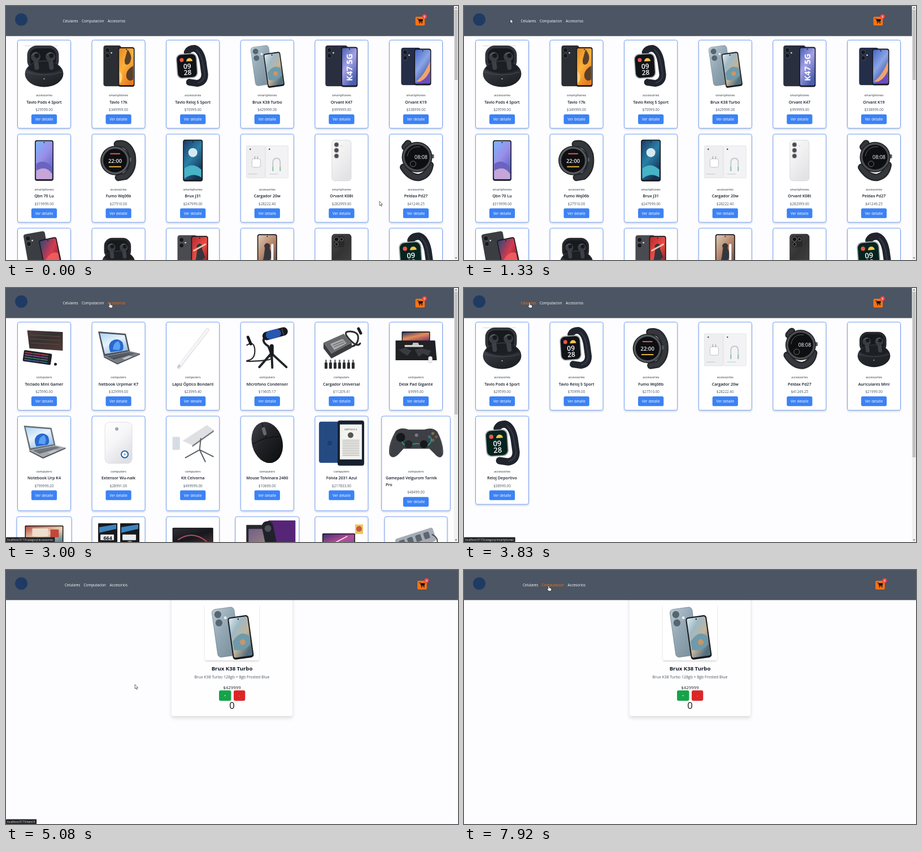
Animation of 800x450 px, one loop 8 s. Source, as an HTML page:

```html
<!DOCTYPE html>
<html lang="es">
<head>
<meta charset="utf-8">
<title>Tienda</title>
<style>
html, body { margin: 0; width: 100%; height: 100%; overflow: hidden; background: #fdfdff; }
svg { display: block; width: 100vw; height: 100vh; }
text { font-family: "Open Sans", "Noto Sans", sans-serif; white-space: pre; }
</style>
</head>
<body>
<svg id="stage" viewBox="0 0 800 450"></svg>
<script>
// --- drawing helpers ---
const defs = [];
const rect = (x, y, w, h, r, f, a = '') => `<rect x="${x}" y="${y}" width="${w}" height="${h}" rx="${r}" fill="${f}" ${a}/>`;
const dot = (x, y, r, f, a = '') => `<circle cx="${x}" cy="${y}" r="${r}" fill="${f}" ${a}/>`;
const path = (d, f, a = '') => `<path d="${d}" fill="${f}" ${a}/>`;
const line = (d, c, w = 1) => path(d, 'none', `stroke="${c}" stroke-width="${w}" stroke-linecap="round" stroke-linejoin="round"`);
const text = (x, y, size, str, f, weight = 400, anchor = 'middle', a = '') =>
  `<text x="${x}" y="${y}" font-size="${size}" fill="${f}" font-weight="${weight}" text-anchor="${anchor}" ${a}>${str}</text>`;
const put = (x, y, s, deg = 0, k = 1) => `<g transform="translate(${x} ${y}) rotate(${deg}) scale(${k})">${s}</g>`;
const grad = (...colors) => {
  const id = 'g' + defs.length;
  const stops = colors.map((c, i) => `<stop offset="${i / (colors.length - 1)}" stop-color="${c}"/>`).join('');
  defs.push(`<linearGradient id="${id}" x1="0" y1="0" x2=".6" y2="1">${stops}</linearGradient>`);
  return `url(#${id})`;
};

// --- product pictures, each centred on 0,0 ---
const back = (x, y, w, h, f, deg = 0, lens = '#15181d') => put(x, y,
  rect(-w / 2, -h / 2, w, h, 4, f, 'stroke="#0004" stroke-width=".8"') +
  dot(-w / 2 + 7, -h / 2 + 8, 4, lens, 'stroke="#8889" stroke-width=".7"') +
  dot(-w / 2 + 7, -h / 2 + 18, 4, lens, 'stroke="#8889" stroke-width=".7"') +
  dot(-w / 2 + 14, -h / 2 + 13, 1.4, '#d8d8d8'), deg);
const front = (x, y, w, h, f, deg = 0, extra = '') => put(x, y,
  rect(-w / 2, -h / 2, w, h, 4, '#17191f') +
  rect(-w / 2 + 1.6, -h / 2 + 1.8, w - 3.2, h - 4.6, 2.5, f) +
  extra + dot(0, -h / 2 + 4, 1, '#111'), deg);
const roundWatch = (x, y, r, rim, strap, hands) =>
  line(strap, '#26282b', 13) + line(strap, '#34373b', 8) +
  rect(x + r - 2, y - 5, 5, 7, 1.5, '#55585c') + dot(x, y, r, '#1b1d20') + dot(x, y, r - 1.5, rim) + dot(x, y, r - 5, '#0d0f12') + hands;
const squareWatch = (f = '#101318') =>
  line('M-10-25Q-7-32 3-32Q14-29 18-8L21 14Q21 28 8 30L-6 28', '#20242d', 12) +
  line('M7-29Q16-20 18-4L21 14Q20 26 9 29', '#343a47', 2) +
  put(-10, -1, rect(-19, -22, 37, 44, 9, '#a9acae') + rect(-17.4, -20.4, 33.8, 40.8, 8, f) +
    dot(-9, -11, 3.5, '#f0554a') + path('M-1-8a5 5 0 0 1 11 0z', '#f7c64a') +
    text(0, 5, 12, '09', '#fff', 600) + text(0, 16, 12, '28', '#fff', 600), -4);
const buds = (f) =>
  rect(-30, -37, 56, 44, 17, f) + rect(-25, -32, 46, 34, 12, '#17191c') +
  `<ellipse cx="0" cy="13" rx="34" ry="23.5" fill="${grad('#464a50', f, '#1d2024')}"/>` +
  path('M-30 5Q-24-9 0-9T30 5Q16 12 0 12T-30 5z', '#1c1f23') +
  [-15, 11].map(x => line(`M${x} -13L${x + 2} 2`, '#3d4147', 8) + dot(x, -17, 8.5, '#3a3e44') + dot(x + 2, -19, 4, '#17191c') + line(`M${x - 6} -20Q${x - 3} -25 ${x + 2} -24`, '#747a82', 1)).join('') +
  line('M-31 10Q0 20 31 10', '#565b62', .7) + dot(0, 22, 1, '#ddd');
const laptop = (body, dark) =>
  path('M-36-30L13-26 20 5-26 14z', dark) + path('M-33-27L11-23.5 17 3-24 10z', grad('#a9d5f3', '#e9f2fa', '#9cc4e6')) +
  path('M-14 7Q-20-6-12-13-2-20 7-11 11 0 6 4z', '#2868d0') + path('M-10 2Q-9-11 0-13 6-4 1 3z', '#5ca2f2') +
  path('M-26 14L20 5 38 9-2 26z', body) + path('M-20 14L19 7 28 9-8 20z', dark) +
  line('M-15 16L23 8', '#888c92', .6) + path('M6 18L18 13 25 14 12 20z', '#bfc3c8') + path('M-26 14L-2 26 38 9v2L-2 28.5-26 16z', '#4e5258');
const screen = (x, y, w, h, f) => rect(x, y, w, h, 1.5, '#141518') + rect(x + 1.5, y + 1.5, w - 3, h - 3, 0, f);

const orange = grad('#e38a24', '#ffb13b', '#e77d1d');
const swirl = path('M2-31Q13-18 5-6-4 0-3-13z', '#5b4129') + path('M12-2Q-2 6 0 18 4 28 12 22z', '#594029') + path('M-12 8Q-4 14-10 28L-12 27z', '#ffd27a');
const misty = put(-9, -1, rect(-16, -35, 32, 69, 5, grad('#b9c9d3', '#93a7b4', '#7d929f'), 'stroke="#6d808c" stroke-width=".6"') +
  dot(-8, -27, 5, '#566671') + dot(-8, -15, 5, '#566671') + dot(2, -21, 2, '#e8eef2'), -8) +
  front(12, 6, 30, 61, grad('#e0e9ed', '#9db9c5', '#c4b39a', '#54707e'), -8,
    path('M-12 4Q2-12 12 0V12Q0 22-12 16z', '#6f9aaa') + dot(2, 7, 4, '#c99669'));
const person = path('M-4-12a5 5 0 1 1 8 0L10 4 5 8 8 26H1L-1 12-5 27-11 25-6 4z', '#35363d');

const art = {
  buds: line('M-34-36.5H24', '#c9c9cc', .8) + buds('#30343a'),
  buds2: put(0, 2, buds('#25272b'), 0, .85),
  p13: back(-11, -1, 31, 72, '#2b2e32') + front(14, 1, 29, 70, orange, 0, swirl),
  watch: squareWatch(), watch2: put(2, 2, squareWatch('#06241f'), 0, 1.08),
  misty,
  k47: back(-9, -1, 39, 72, '#2a2f40') + front(14, 1, 29, 71, grad('#4b62b5', '#a5a2e6', '#4a5fb0'), 0,
    text(-25, 5, 14.5, 'K47 5G', '#fff', 700, 'start', 'transform="rotate(-90)"')),
  k19: back(-9, 0, 34, 66, '#252e49') + front(12, 1, 30, 65, grad('#4567c6', '#8aa5e6', '#3c489b'), 0,
    path('M-12 26Q2 16 13-10V26z', '#f0a46b') + path('M-12 29Q6 24 13 6V29z', '#6a4ec0')),
  qbn: front(0, 0, 33, 72, grad('#79b6ff', '#9a8fe8', '#5f62c8'), 0,
    path('M-14 6Q0-4 14 12V33H-14z', '#6a63c0') + path('M-14 18Q4 8 14 24V33H-14z', '#c6a6d8')),
  fumo: roundWatch(-6, 0, 26, '#54575b', 'M-2-29Q17-33 24-10 28 16 12 28L0 30',
    text(-6, 4, 9.5, '22:00', '#f4f4f4', 600) + line('M-14-12H2', '#e65a4d', 2) + line('M-16 11H4', '#e5b23f', 2)),
  j31: front(0, 0, 35, 74, grad('#1c3c66', '#297fa8', '#16304e'), 0,
    dot(0, -14, 8, '#d7e9f0') + path('M-15 14Q0 2 15 16V30Q0 20-15 32z', '#48b3c6')),
  cargador: rect(-37, -26, 33, 57, 1, '#eeeef0', 'stroke="#d6d8dc" stroke-width=".6"') +
    rect(-3, -26, 40, 57, 1, '#f3f3f5', 'stroke="#d6d8dc" stroke-width=".6"') +
    rect(-27, -3, 15, 15, 3, '#fff', 'stroke="#a9adb2" stroke-width=".7"') + line('M-22-3v-4m5 4v-4', '#8f9398', 1) +
    line('M10 18V4Q10-4 17-4Q23-4 23 4V18', '#c4c9ce', 2) + line('M10 12v6m13-6v6', '#8bc8a0', 2) +
    dot(-30, -20, 1.2, '#333') + dot(4, -20, 1.2, '#333') + line('M-33 24h15m22 0h15', '#b8bbc0', .8),
  k08: rect(-17, -36, 34, 72, 5, grad('#fbfbfb', '#f0f0f1', '#e3e3e6'), 'stroke="#cfcfd3" stroke-width=".7"') +
    [-28, -18, -8].map(y => dot(-9, y, 4, '#484b52', 'stroke="#aaa"')).join('') + dot(0, -26, 1.5, '#ddd'),
  peldax: roundWatch(2, -6, 27, '#4a4c4f', 'M-19-24L-14-30M-22 12Q-10 31 6 30 22 26 25 8',
    text(9, -3, 9, '08:08', '#fff') + dot(-5, 6, 5, 'none', 'stroke="#999" stroke-width=".7"') + line('M-15-8A18 18 0 0 1 7-24', '#777', .8)),
  k38: back(-12, -3, 38, 72, '#3a3d42', -10) + front(13, 6, 32, 70, grad('#2b4778', '#d83a4c', '#59202f'), -12,
    path('M-13 4Q2-14 13-6V10Q2 24-13 16z', '#ef5a5c') + path('M-13 22Q0 12 13 18V29H-13z', '#233763')),
  zuli: back(-10, 0, 34, 68, '#4a4b50') + front(12, 1, 30, 68, grad('#b82930', '#e94c43', '#831e28'), 0, person + line('M-10-8L10-19', '#f0c4b2', 3)),
  mirovel: front(0, 0, 35, 72, grad('#dcc8b4', '#b58468', '#6a5045'), 0,
    person + dot(-6, 20, 8, 'none', 'stroke="#33312f" stroke-width="1.5"') + line('M9-17V24', '#fff', 4)),
  r60: rect(-17, -36, 34, 73, 5, grad('#484849', '#343435', '#414042'), 'stroke="#222"') + rect(-14, -33, 19, 20, 4, '#29292b') +
    dot(-9, -27, 4, '#111', 'stroke="#777"') + dot(0, -27, 3, '#111', 'stroke="#777"') + dot(-9, -18, 3, '#111', 'stroke="#777"'),
  n44: back(-4, 1, 40, 74, '#25262a', 48) + front(4, 0, 39, 76, grad('#39335f', '#8160a8', '#191a27'), 43,
    path('M-17-4L17-18V2L-17 17z', '#e58c54') + path('M-17 10L17-4V7L-17 22z', '#d9d2e4')),
  green: back(-13, 0, 32, 72, '#36504c', 0) + front(13, 1, 31, 70, grad('#234d42', '#6ea37c', '#173b38'), 0, path('M-13 12Q0-18 14-4V20Q0 4-13 25z', '#9fc5a8')),
  violet: back(-11, -1, 35, 74, '#24293a') + front(13, 1, 31, 72, grad('#493a7e', '#b14ab4', '#583fa6'), 0, line('M-9 24L9-12', '#f3d8ff', 3)),
  teal: back(-13, -1, 32, 72, '#456d77') + front(13, 1, 31, 70, orange, 0, swirl),
  keys: path('M-30-32L33-29 33 4-26 0z', grad('#4a3c3a', '#34302f', '#4b3936')) + line('M-25-24L28-21M-24-17L28-14M-23-10L28-7', '#60453f', 1.4) +
    put(-12, 16, rect(-25, -10, 50, 20, 2, '#202126') +
      [0, 1, 2, 3].map(i => line(`M-22 ${-6 + i * 4.2}h12m2 0h12m2 0h12`, ['#b03c4c', '#8e44a8', '#35875f', '#345f9e'][i], 1.8)).join(''), 8) +
    dot(20, 28, 2.5, '#222'),
  netbook: laptop('#777d85', '#4b5159'), notebook: laptop('#a5a9ae', '#6b7179'),
  pencil: line('M-25 33L26-33', '#d9d9de', 6) + line('M-24 31L26-33', '#f6f6f8', 4.5) + path('M-27 35L-25 28-21 31z', '#c5c5ca'),
  mic: line('M-36-6Q-23-14-22 2T-33 21-14 22 4 14', '#292b2f', 2.2) + line('M-34-20L-29-8', '#17181b', 5) +
    line('M-4-20Q-11-12 2-4L7 9L-14 33M8 9L34 33M8 9L9 34', '#222429', 4) + line('M8-4V10', '#17191f', 7) +
    line('M-1-22L29-30', '#17191f', 15) + line('M5-24L17-27', '#2856b0', 15) + line('M26-35L29-24', '#4c5058', 1.4),
  charger: line('M10-4Q26-1 29-15T16-30 14-16 33-9', '#2a2c30', 3) + line('M30-35L34-27', '#1c1e21', 5) + path('M-32-10L4-26 18-10-18 9z', '#686a6d') +
    path('M-32-10L-18 9V18L-32 0zM-18 9L18-10V-1L-18 18z', '#3a3c3f') + path('M-20-8L2-17 9-9-13 3z', '#a7a8aa') + line('M-15-6L3-13M-13-3L5-10', '#55575a', 1) +
    [0, 1, 2, 3, 4, 5, 6].map(i => rect(-30 + i * 8, 25, 5, 11, 1, '#292b2f') + rect(-29 + i * 8, 20, 3, 5, 0, '#77797c')).join(''),
  desk: screen(-25, -30, 50, 21, grad('#27346c', '#e58c55', '#813867')) + path('M-36-14H34L37 21H-36z', '#202125') +
    path('M-5-10h9l2 5H-7z', '#bfc1c4') + rect(-20, -6, 33, 3.5, 1, '#d3d4d6') +
    path('M-31 2L-18-1-8 4-15 13-22 9zM-2 2L10 0 27 4 22 13 12 9 5 15z', '#393b40') + rect(22, 14, 7, 12, 3.5, '#eee', 'stroke="#bbb" stroke-width=".5"'),
  extensor: rect(-24, -36, 48, 73, 8, grad('#fff', '#f6f6f7', '#dfe0e4'), 'stroke="#d4d5da" stroke-width=".7"') +
    dot(-3, -24, 3, '#9ba9b2') + dot(11, 21, 6, '#fff', 'stroke="#275d9d" stroke-width="2"') + dot(11, 21, 2, '#75c5ed'),
  dish: rect(-36, -10, 13, 23, 1, '#d5dce4') + path('M-18-3L25-31 37-22-1 5z', '#dfe0e3') + path('M-1 5L37-22V-19L-1 8z', '#777b82') +
    line('M14-7L12 13M12 13L-13 27M12 13L36 25M12 13L22 34', '#5d6066', 2),
  mouse: put(0, 0, `<ellipse rx="27" ry="37" fill="${grad('#45474a', '#222326', '#101113')}"/>` + line('M0-36V-8M-26-4Q0-11 26-4', '#0a0a0b', 1) + rect(-3, -28, 6, 15, 3, '#66686b'), -15),
  reader: rect(-40, -37, 46, 73, 4, '#254a82') + dot(-21, 1, 4, '#1b3d70') + rect(-7, -39, 47, 80, 4, '#17202f') + rect(-3, -32, 39, 62, 0, '#f2f2ee') +
    text(16, -22, 4, 'CAPÍTULO 4', '#333') + dot(16, -13, 5, '#555') + [...Array(10)].map((_, i) => line(`M2 ${-4 + i * 3}H31`, '#878783', .7)).join(''),
  pad: path('M-36-20Q-27-28-13-23H15Q30-28 38-19Q50 4 48 21Q43 32 33 20L24 11H-22L-31 21Q-42 31-47 21Q-50 4-36-20z', '#3c3f43') +
    line('M-25-9Q-27 7-10 5 2-1 14 5 28 7 27-8', '#27b5a3', 1.3) + line('M-38-14Q-47 4-45 18M40-14Q48 4 46 18', '#55595e', 1) +
    dot(-27, -9, 8, '#16181b') + dot(14, 3, 7, '#16181b') + dot(-13, 3, 7, '#222529') +
    dot(30, -16, 2.7, '#77704f') + dot(24, -10, 2.7, '#4d6484') + dot(36, -10, 2.7, '#844d4d') + dot(30, -4, 2.7, '#4d7857') + dot(1, -13, 3, '#777b80'),
  aio: screen(-34, -31, 68, 43, grad('#b54e43', '#eed3b4', '#40748e')) + rect(-21, -26, 28, 14, 0, '#ede0ce') + rect(11, -24, 15, 14, 0, '#c2473c'),
  ink: [-36, 3].map(x => rect(x, -35, 34, 58, 1, '#18191d') + path(`M${x + 2} -28L${x + 32} -33V-25L${x + 2} -18z`, '#3c83bd') + rect(x + 4, -15, 24, 10, 1, '#e9eaec')).join('') +
    text(-19, -6, 9, '664', '#18191d', 700) + dot(20, 2, 6, '#4c97bd'),
  monitor: screen(-36, -27, 72, 43, grad('#302d37', '#16181e', '#55313b')) + line('M-26-6Q0-23 24-3', '#b34f54', 2),
  purple: rect(-37, -32, 74, 50, 1, '#26282d') + rect(-33, -25, 35, 40, 1, grad('#6e5e8a', '#a2857c')) + rect(2, -40, 48, 44, 1, '#572577') + put(4, -13, rect(-10, -26, 20, 54, 9, '#202229') + dot(0, -13, 6, '#4b4f57'), -12),
  gaming: rect(24, -33, 14, 17, 0, '#ecc758') + dot(31, -25, 5, '#c55b48') + screen(-34, -17, 58, 36, grad('#413173', '#ba4d97', '#4061ad')) + line('M-22 5L10-12', '#fff', 1.5),
  strip: put(0, -4, rect(-35, -14, 70, 25, 4, '#a6adb5') + [-24, -9, 6, 21].map(x => rect(x - 5, -9, 10, 12, 2, '#5d6570')).join(''), -18) + line('M29-15Q43-8 35 7', '#424850', 2)
};

// --- catalogue: name|price|art|card width ---
const stock = {
  accessories: ['Tavlo Pods 4 Sport|29599.00|buds', 'Tavlo Reloj 5 Sport|70999.00|watch', 'Fumo Wq06b|27510.00|fumo', 'Cargador 20w|28222.40|cargador',
    'Peldax Pd27|41249.25|peldax', 'Auriculares Mini|21999.00|buds2', 'Reloj Deportivo|38999.00|watch2'],
  smartphones: ['Tavlo 17k|349999.00|p13', 'Brux K38 Turbo|429999.00|misty', 'Orvant K47|999999.00|k47', 'Orvant K19|338999.00|k19', 'Qbn 70 Lu|319999.00|qbn',
    'Brux J31|247999.00|j31', 'Orvant K08t|282999.00|k08', 'Brux K38|369999.00|k38', 'Dravimo Zuli Plus|119998.00|zuli', 'Mirovel 3 Ultra|63399.00|mirovel',
    'Glavo R60|269999.00|r60', 'Glavo N44 Plus|139999.00|n44', '||green', '||violet', '||teal'],
  computers: ['Teclado Mini Gamer|25990.00|keys', 'Netbook Urpimar K7|329999.00|netbook', 'Lápiz Óptico Bondaril|23999.40|pencil', 'Micrófono Condenser|19605.17|mic',
    'Cargador Universal|11209.41|charger', 'Desk Pad Gigante|9999.00|desk', 'Notebook Urp K4|799999.20|notebook', 'Extensor Wu-nalk|28991.00|extensor', 'Kit Celvorna|499999.00|dish',
    'Mouse Tolvinara 2460|10669.00|mouse', 'Folvia 2031 Azul|217833.00|reader', 'Gamepad Velgurom Tarnik/Pro|48499.00|pad|121.5',
    '||aio|97', '||ink', '||monitor', '||purple|113', '||gaming', '||strip|111']
};
const find = {};
const lists = {};
for (const cat in stock) {
  lists[cat] = stock[cat].map(s => {
    const [name, price, pic, w = 94] = s.split('|');
    return find[pic] = { name, price, pic, w: +w, cat };
  });
}
lists.home = 'buds p13 watch misty k47 k19 qbn fumo j31 cargador k08 peldax k38 buds2 zuli mirovel r60 watch2'.split(' ').map(k => find[k]);

const button = (x, y, f = '#3b82f6') => rect(x - 22.6, y, 45.2, 17.2, 2.6, f) + text(x, y + 11.2, 6.4, 'Ver detalle', '#fff');
const card = (p, x, y, h) => {
  const lines = p.name.split('/');
  const left = lines.length > 1;
  const drop = (lines.length - 1) * 11.6;
  return rect(x - p.w / 2, y, p.w, h, 3.3, '#fff', 'stroke="#5b8ff0" stroke-width=".85" filter="url(#soft)"') +
    put(x, y + 46.7, art[p.pic]) + text(x, y + 99.8, 5.3, p.cat, '#5b6069', 600) +
    lines.map((s, i) => text(left ? x - 53.5 : x, y + 112.2 + i * 11.6, 7.1, s, '#141a26', 600, left ? 'start' : 'middle')).join('') +
    text(x, y + 125.8 + drop, 6.3, '$' + p.price, '#4b5563') + button(x, y + 131.6 + drop);
};
const grid = (name) => {
  const tall = name === 'computers' ? 11.5 : 0;
  return lists[name].map((p, i) => {
    const row = Math.floor(i / 6);
    return card(p, 67.5 + i % 6 * 131.6, 60.4 + row * 166.6 + (row > 1 ? tall : 0), 156.2 + (row ? tall : 0));
  }).join('');
};
const detail = rect(293, 40, 214, 218.5, 4, '#fefeff', 'filter="url(#lift)"') +
  rect(352, 60, 96, 100, 4, '#fff', 'filter="url(#soft)"') + put(400.5, 112, art.misty, 0, 1.24) +
  text(400, 177.6, 9.6, 'Brux K38 Turbo', '#141a26', 700) +
  text(400, 192, 6.9, 'Brux K38 Turbo 128gb + 8gb Frosted Blue', '#4b5563', 500) +
  text(400, 210.8, 7.9, '$429999', '#222') +
  rect(377, 213.3, 21.5, 18.5, 3, '#16a34a') + rect(403, 213.3, 20.3, 18.5, 3, '#dc2626') +
  text(387.8, 225, 6, '+', '#fff', 600) + text(413, 225, 6, '-', '#fff') +
  text(400, 246.4, 16.5, '0', '#111', 400, 'middle', 'id="count"');

// --- page assembly ---
const pages = ['home', 'smartphones', 'computers', 'accessories', 'detail'];
const thumbEnd = { home: 131, smartphones: 359, computers: 224, accessories: 300 };
const body = pages.map(n => `<g id="${n}">${n === 'detail' ? detail : grid(n)}</g>`).join('');
const nav = [['Celulares', 100.5], ['Computacion', 134], ['Accesorios', 180]];
const stage = document.getElementById('stage');
stage.innerHTML = `<defs>
  <filter id="soft" x="-20%" y="-20%" width="140%" height="140%"><feDropShadow dx="0" dy="1.8" stdDeviation="1.7" flood-opacity=".16"/></filter>
  <filter id="lift" x="-20%" y="-20%" width="140%" height="140%"><feDropShadow dx="0" dy="3.5" stdDeviation="3" flood-opacity=".14"/></filter>
  ${defs.join('')}</defs>` +
  rect(0, 0, 800, 450, 0, '#fdfdff') + body + `<g id="hot">${button(199.1, 192, '#2563eb')}</g>` +
  rect(0, 0, 800, 53.3, 0, '#4b5563') + dot(27, 24, 11, '#1f3b63') +
  '<g id="bar">' + nav.map(([s, x], i) => text(x, 29.2, 6.3, s, '#fff', 400, 'start', `id="nav${i}"`)).join('') +
  rect(724.6, 19, 16.6, 15.4, 2, '#f97316') +
  line('M728 22.6h1.7l1.6 5.6h5.5', '#111', .9) + path('M730 23.2h8.2l-1.2 4.2h-5.7z', '#111') + dot(732, 30, .95, '#111') + dot(736.2, 30, .95, '#111') +
  dot(740.8, 18.6, 4.2, '#ef4444') + text(740.8, 20.5, 5.2, '0', '#fff', 600) + '</g>' +
  '<g id="scroll">' + rect(792.8, 0, 7.2, 450, 0, '#f1f1f1') + rect(793.8, 6.5, 5.4, 100, 0, '#c1c1c1', 'id="thumb"') +
  path('M794.7 4.3l1.8-2.2 1.8 2.2z', '#505050') + path('M794.7 445.6l1.8 2.2 1.8-2.2z', '#505050') + '</g>' +
  '<g id="status">' + rect(0, 441.4, 83, 8.6, 1, '#202327', 'id="statusBox"') + text(2, 447.6, 4.85, '', '#e8eaed', 400, 'start', 'id="link"') + '</g>' +
  '<g id="cursor">' + path('M0 0V7.6l1.8-1.6 1.3 2.8 1.2-.5-1.3-2.8h2.4z', '#fff', 'id="arrow" stroke="#111" stroke-width=".6"') +
  path('M-1.1.6q1-1.4 2 0v3l3.1.8q1 .4.8 1.5l-.7 3.3H-.2l-2.9-3.4q.1-1.2 1.2-.7l.8.7z', '#fff', 'id="hand" stroke="#111" stroke-width=".6"') + '</g>';
const ui = {};
stage.querySelectorAll('[id]').forEach(e => ui[e.id] = e);

// --- timeline ---
const show = [[0, 'home'], [1910, 'smartphones'], [2250, 'computers'], [3160, 'accessories'], [4080, 'smartphones'], [4910, 'detail']];
const hover = [[0, ''], [1740, 'nav0'], [1990, 'nav1'], [2080, ''], [2330, 'nav2'], [3330, 'nav1'], [3490, 'nav0'], [4160, ''], [4660, 'hot'], [4910, ''],
  [5490, 'plus'], [6660, 'minus'], [7660, ''], [7750, 'nav1']];
const links = [[0, ''], [1740, 'category/smartphones'], [1990, 'category/computers'], [2330, 'category/accessories'], [3330, 'category/computers'],
  [3490, 'category/smartphones'], [4660, 'item/4'], [5400, '']];
const counts = [[0, 0], [5580, 1], [5830, 2], [6000, 3], [6250, 4], [6830, 3], [7080, 2], [7330, 1], [7580, 0]];
const moves = [[0, 661, 346], [250, 661, 346], [1250, 84, 25], [1330, 82, 23], [1660, 84, 24], [1830, 114, 25], [1910, 118, 25], [2080, 158, 24], [2170, 183, 21],
  [2420, 184, 26], [3170, 184, 26], [3580, 116, 26], [4080, 116, 26], [4420, 151, 154], [4700, 200, 200], [4950, 200, 200], [5500, 391, 219],
  [6420, 391, 219], [6670, 413, 220], [7580, 413, 220], [7830, 150, 28], [8000, 150, 28]];
const at = (list, t) => list.filter(k => k[0] <= t).pop()[1];
const fade = (t, from) => Math.max(0, 1 - (t - from) / 250);
const toggle = (e, on) => e.setAttribute('display', on ? 'inline' : 'none');

function update(ms) {
  const t = Math.floor((Math.floor(ms / 10) + .5) * .12) * 250 / 3;
  const page = at(show, t), over = at(hover, t), link = at(links, t);
  const wide = page === 'detail';
  pages.forEach(n => toggle(ui[n], n === page));
  toggle(ui.hot, over === 'hot');
  toggle(ui.scroll, !wide);
  if (!wide) ui.thumb.setAttribute('height', thumbEnd[page] - 6.5);
  ui.bar.setAttribute('transform', `translate(${wide ? 3.6 : 0} 0)`);
  nav.forEach((_, i) => ui['nav' + i].setAttribute('fill', over === 'nav' + i ? '#f97316' : '#fff'));
  ui.count.textContent = at(counts, t);

  toggle(ui.status, link);
  ui.link.textContent = 'localhost:5173/' + link;
  if (link) ui.statusBox.setAttribute('width', ui.link.getComputedTextLength() + 5);
  ui.status.setAttribute('opacity', t > 5080 ? fade(t, 5080) : t > 4330 && t < 4660 ? fade(t, 4330) : 1);

  const i = Math.max(1, moves.findIndex(k => k[0] > t));
  const [a, b] = [moves[i - 1], moves[i]];
  const u = (t - a[0]) / (b[0] - a[0]), e = u * u * (3 - 2 * u);
  ui.cursor.setAttribute('transform', `translate(${a[1] + (b[1] - a[1]) * e} ${a[2] + (b[2] - a[2]) * e})`);
  toggle(ui.hand, over);
  toggle(ui.arrow, !over);
}
const start = performance.now();
function tick() {
  update((performance.now() - start) % 8000);
  requestAnimationFrame(tick);
}
tick();
</script>
</body>
</html>
```
